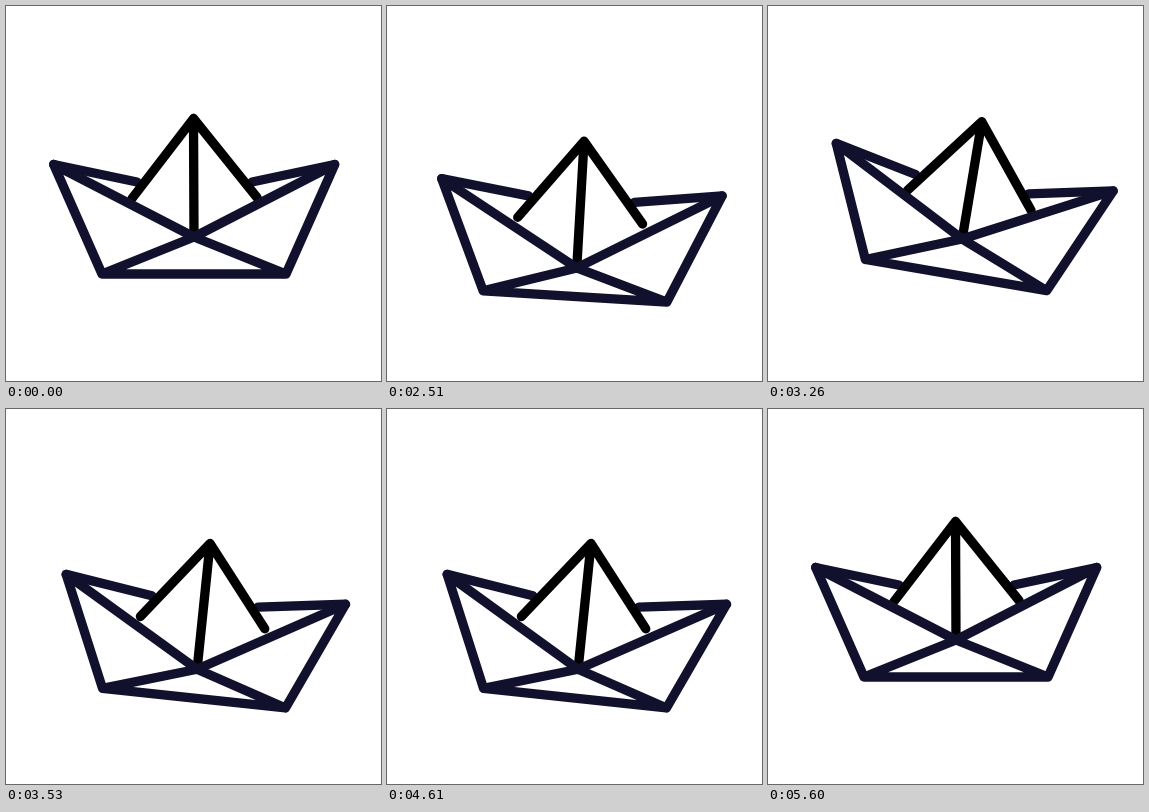
These frames come from a looping animation (375x375 px, 5660 ms). An HTML page:

```html
<!DOCTYPE html>
<html lang="en">
<head>
<meta charset="utf-8">
<title>Paper boat</title>
<style>
html, body { margin: 0; width: 100%; height: 100%; overflow: hidden; background: #fff; }
svg { display: block; width: 100vw; height: 100vh; }
path { fill: none; stroke-width: 9.3; stroke-linecap: round; stroke-linejoin: round; }
.hull { stroke: #11112e; }
.sail { stroke: #000; }
</style>
</head>
<body>
<svg viewBox="0 0 375 375">
  <g id="boat">
    <path id="rim" class="hull"/>
    <path id="sail" class="sail"/>
    <path id="hull" class="hull"/>
  </g>
</svg>
<script>
const LOOP = 5660, START = 2030, STEP = 30, END = 5600;
const RISE = 1995, HALF = 540, TURNS = 5;
const [boat, rim, sail, hull] = ['boat', 'rim', 'sail', 'hull'].map(id => document.getElementById(id));

const ease = k => (1 - Math.cos(Math.PI * k)) / 2;

// Rises from rest to its first peak, swings between high and low, then settles.
function swing(t, low, high, peak) {
  const last = peak + TURNS * HALF;
  if (t <= RISE || t >= END) return 0;
  if (t < peak) return high * ease((t - RISE) / (peak - RISE));
  if (t > last) return low * ease((END - t) / (END - last));
  return high + (low - high) * ease((t - peak) / HALF);
}

function draw(ms) {
  let t = ms % LOOP;
  t = t < START ? 0 : Math.min(END, START + Math.floor((t - START) / STEP) * STEP);

  const tilt = swing(t, -5, 10.5, 2257);
  const heave = swing(t, -8, 22.5, 2522);
  const pitch = Math.max(0, heave) / 20;   // the fold dips and the far rim lifts
  const fold = `188 ${231 + 7.5 * pitch}`;
  const rimY = 176 - 5 * pitch;

  boat.setAttribute('transform', `translate(0 ${heave}) rotate(${tilt} 188 268)`);
  rim.setAttribute('d', `M47.7 158.5L${131 + 4 * pitch} ${rimY}M328.7 158.5L${246 - 4 * pitch} ${rimY}`);
  sail.setAttribute('d', `M126 192.5L187.5 112.5L251 191.5M187.5 112.5L${fold}`);
  hull.setAttribute('d', `M47.7 158.5L${fold}L280 268H96L${fold}L328.7 158.5L280 268M47.7 158.5L96 268`);
}

const begin = performance.now();
function tick() {
  draw(performance.now() - begin);
  requestAnimationFrame(tick);
}
draw(0);
requestAnimationFrame(tick);
</script>
</body>
</html>
```
